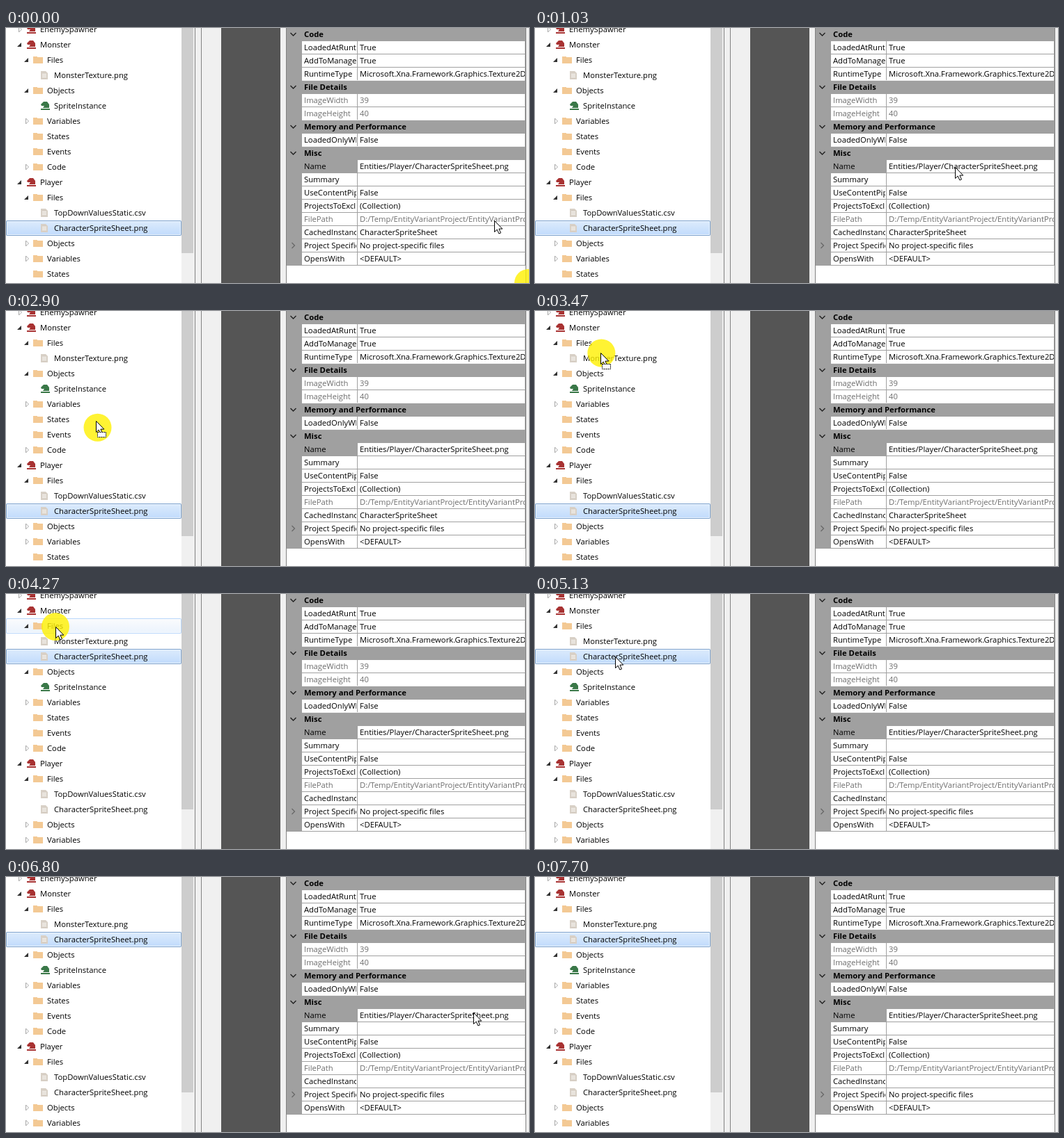
Recreate the animation shown at these times as an HTML page with a canvas. Size 751x367 px, loop 8610 ms.

```html
<!DOCTYPE html>
<html lang="en">
<head>
<meta charset="utf-8">
<title>Dragging a file between entities</title>
<style>
  html, body { margin: 0; width: 100%; height: 100%; overflow: hidden; background: #fff; }
  canvas { display: block; }
</style>
</head>
<body>
<canvas id="stage" width="751" height="367"></canvas>
<script>
const ctx = document.getElementById('stage').getContext('2d');
const LOOP = 8610;
const FONT = '"Open Sans", "Noto Sans", sans-serif';
const GREY = '#a0a0a0', EDGE = '#828282', PANEL = '#f0f0f0';

// Key moments in ms
const DRAG_START = 2500, DROP = 4200, DRAG_END = 4670;
const CLICK = 5270, RELEASE = 5730, EXIT = 7700;

// Tree rows: [level, icon, label, state]; state is 'open', 'closed' or absent.
const SHEET = [2, 'file', 'CharacterSpriteSheet.png'];
const TREE_HEAD = [
  [0, 'entity', 'EnemySpawner', 'closed'],
  [0, 'entity', 'Monster', 'open'],
  [1, 'folder', 'Files', 'open'],
  [2, 'file', 'MonsterTexture.png']
];
const TREE_TAIL = [
  [1, 'folder', 'Objects', 'open'],
  [2, 'object', 'SpriteInstance'],
  [1, 'folder', 'Variables', 'closed'],
  [1, 'folder', 'States'],
  [1, 'folder', 'Events'],
  [1, 'folder', 'Code', 'closed'],
  [0, 'entity', 'Player', 'open'],
  [1, 'folder', 'Files', 'open'],
  [2, 'file', 'TopDownValuesStatic.csv'],
  SHEET,
  [1, 'folder', 'Objects', 'closed'],
  [1, 'folder', 'Variables', 'closed'],
  [1, 'folder', 'States']
];

// Property rows: a string is a category, otherwise [name, value, style].
const PROPERTIES = [
  'Code',
  ['LoadedAtRuntime', 'True'],
  ['AddToManagers', 'True'],
  ['RuntimeType', 'Microsoft.Xna.Framework.Graphics.Texture2D'],
  'File Details',
  ['ImageWidth', '39', 'readonly'],
  ['ImageHeight', '40', 'readonly'],
  'Memory and Performance',
  ['LoadedOnlyWhenReferenced', 'False'],
  'Misc',
  ['Name', 'Entities/Player/CharacterSpriteSheet.png', 'selected'],
  ['Summary', ''],
  ['UseContentPipeline', 'False'],
  ['ProjectsToExcludeFrom', '(Collection)'],
  ['FilePath', 'D:/Temp/EntityVariantProject/EntityVariantProject/Content', 'readonly'],
  ['CachedInstanceName', 'CharacterSpriteSheet'],
  ['Project Specific Files', 'No project-specific files', 'expandable'],
  ['OpensWith', '<DEFAULT>']
];

// The pointer glides from place to place and rests in between.
const START = { x: 701, y: 277 };
const glides = [];
const glide = (from, to, x, y) => glides.push({ from, to, x, y });
function sweep(start, strokes, duration, stride, ends, y) {
  for (let i = 0; i < strokes; i++)
    glide(start + i * stride, start + i * stride + duration, ends[i % 2], y);
}
glide(30, 480, 560, 203);
glide(480, 870, 640, 201);
sweep(880, 2, 230, 340, [589, 645], 199);
glide(1570, 1900, 187, 278);
glide(1900, 2400, 168, 289);
glide(DRAG_START - 30, 3250, 100, 63);
glide(3330, 3800, 71, 47);
glide(DRAG_END - 30, 5130, 115, 90);
glide(RELEASE - 30, 6000, 613, 234);
glide(6150, 6570, 582, 197);
sweep(6570, 3, 220, 220, [672, 584], 195);
glide(7370, EXIT, 352, 374);

function pointerAt(time) {
  let { x, y } = START;
  for (const leg of glides) {
    const u = Math.min(Math.max((time - leg.from) / (leg.to - leg.from), 0), 1);
    const eased = u * u * (3 - 2 * u);
    x += (leg.x - x) * eased;
    y += (leg.y - y) * eased;
  }
  return [x, y];
}

function rect(x, y, w, h, fill) {
  ctx.fillStyle = fill;
  ctx.fillRect(x, y, w, h);
}

function text(label, x, baseline, color = '#000', weight = 400) {
  ctx.font = `${weight} 11.25px ${FONT}`;
  ctx.fillStyle = color;
  ctx.fillText(label, x, baseline);
}

function shape(points, x, y, fill, stroke, width = 1) {
  ctx.beginPath();
  for (const [px, py] of points) ctx.lineTo(x + px, y + py);
  if (fill) {
    ctx.closePath();
    ctx.fillStyle = fill;
    ctx.fill();
  }
  if (stroke) {
    ctx.strokeStyle = stroke;
    ctx.lineWidth = width;
    ctx.stroke();
  }
}

// A chevron or triangle pointing right, or down when turned.
function arrow(x, y, size, fill, stroke, width, down) {
  const points = [[-size / 2, -size], [size / 2, 0], [-size / 2, size]];
  shape(down ? points.map(([a, b]) => [b, a]) : points, x, y, fill, stroke, width);
}

function clippedText(label, x, y, left, right, color) {
  ctx.save();
  ctx.beginPath();
  ctx.rect(left, y - 10, right - left, 19);
  ctx.clip();
  text(label, x, y + 4, color);
  ctx.restore();
}

function knight(x, y, color) {
  shape([[3, 3], [5, 0], [1, 0], [0, -2], [4, -6], [9, -6], [12, -2], [12, 3]], x, y, color);
  rect(x, y + 4, 13, 2, color);
}

const ICONS = {
  entity: (x, y) => knight(x, y, '#a83232'),
  object: (x, y) => knight(x, y, '#3a7848'),
  folder(x, y) {
    rect(x - 1, y - 5, 6, 2, '#f3c994');
    rect(x - 1, y - 4, 14, 9, '#f3c994');
  },
  file(x, y) {
    shape([[0, -6], [7, -6], [10, -3], [10, 6], [0, 6]], x, y, '#d8d0c6');
    for (let dy = -2; dy <= 2; dy += 2) rect(x + 2, y + dy, 6, 1, '#f8f6f2');
  }
};

function expander(x, y, state) {
  if (state === 'open') shape([[6, -3], [6, 3], [0, 3]], x + 1, y, '#333');
  else arrow(x + 5.5, y, 4, '#fff', '#a8a8a8');
}

function rowHighlight(y, border, inner, top, bottom) {
  const fill = ctx.createLinearGradient(0, y - 10, 0, y + 10);
  fill.addColorStop(0, top);
  fill.addColorStop(1, bottom);
  [border, inner, fill].forEach((color, inset) => {
    ctx.beginPath();
    ctx.roundRect(inset, y - 11 + inset, 252 - 2 * inset, 22 - 2 * inset, 2 - inset);
    ctx.fillStyle = color;
    ctx.fill();
  });
}

function drawTree(time) {
  const copied = time >= DROP;
  const rows = [...TREE_HEAD, ...(copied ? [SHEET] : []), ...TREE_TAIL];
  const selected = copied ? TREE_HEAD.length : rows.indexOf(SHEET);
  const hovered = copied && time < DRAG_END ? 2 : -1;
  rows.slice(0, 17).forEach(([level, icon, label, state], i) => {
    const y = 2 + 22 * i, x = 29 + 10 * level;
    if (i === selected) rowHighlight(y, '#7da2ce', '#ebf4fd', '#dcebfc', '#c1dbfc');
    if (i === hovered) rowHighlight(y, '#b8d6fb', '#fcfdfe', '#fafbfd', '#ebf3fd');
    if (state) expander(x - 14, y, state);
    ICONS[icon](x + 1, y);
    text(label, x + 20, y + 4);
  });
  rect(252, 0, 18, 367, PANEL);
  rect(252, 0, 17, copied ? 310 : 324, '#cdcdcd');
}

function drawDivider() {
  rect(270, 0, 132, 367, PANEL);
  rect(271, 0, 1, 367, EDGE);
  rect(280, 0, 1, 367, EDGE);
  rect(309, 0, 85, 367, '#555');
}

function drawProperties(time) {
  rect(402, 0, 23, 342, GREY);
  PROPERTIES.forEach((row, i) => {
    const y = 9 + 19 * i;
    rect(425, y + 9, 321, 1, GREY);
    if (typeof row === 'string') {
      rect(425, y - 10, 321, 1, PANEL);
      rect(425, y - 9, 321, 18, GREY);
      arrow(412.5, y, 4, null, '#222', 1.4, true);
      text(row, 428, y + 4, '#000', 700);
      return;
    }
    const [name, value, style] = row;
    const color = style === 'readonly' ? '#6d6d6d' : '#000';
    if (style === 'selected') rect(425, y - 9, 79, 18, GREY);
    if (style === 'expandable') arrow(412.5, y, 4, null, '#666', 1.2);
    rect(504, y - 9, 1, 18, GREY);
    clippedText(name, 428, y, 425, 503, color);
    if (name !== 'CachedInstanceName' || time < DROP + 60)
      clippedText(value, 508, y, 505, 745, color);
  });
  rect(745, 0, 1, 342, GREY);
  rect(402, 0, 1, 367, EDGE);
  rect(746, 0, 1, 367, EDGE);
  rect(747, 0, 4, 367, PANEL);
}

function clickCircle(x, y) {
  ctx.beginPath();
  ctx.arc(x, y, 20, 0, 2 * Math.PI);
  ctx.fillStyle = 'rgba(255, 241, 0, 0.8)';
  ctx.fill();
}

function drawPointer(time) {
  const within = (from, to) => time >= from && time < to;
  if (time < 30) clickCircle(750, 367);
  // The circle trails slightly behind the pointer.
  if (within(DRAG_START, DRAG_END) || within(CLICK, RELEASE))
    clickCircle(...pointerAt(time - 22));
  if (time >= EXIT) return;

  const [x, y] = pointerAt(time).map(Math.round);
  shape([[0, 0], [0, 16], [3.7, 12.6], [6.4, 18.5], [9, 17.4], [6.4, 11.6], [11.3, 11.6]],
    x + 0.5, y + 0.5, '#fff', '#000');
  if (within(DRAG_START + 60, DROP)) {
    rect(x + 2, y + 16, 13, 8, '#fff');
    ctx.setLineDash([2, 1]);
    ctx.strokeRect(x + 2.5, y + 16.5, 12, 7);
    ctx.setLineDash([]);
  }
}

function frame() {
  const time = performance.now() % LOOP;
  rect(0, 0, 751, 367, '#fff');
  drawTree(time);
  drawDivider();
  drawProperties(time);
  drawPointer(time);
  requestAnimationFrame(frame);
}
requestAnimationFrame(frame);
</script>
</body>
</html>
```
